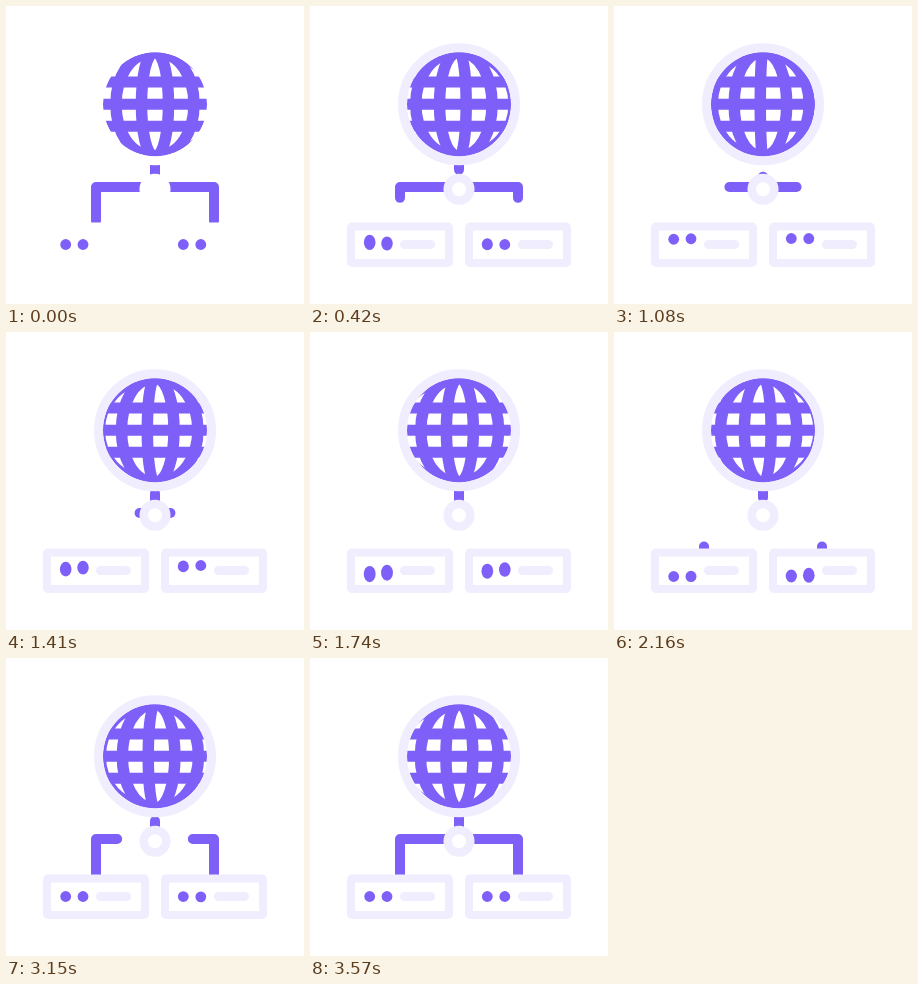
Recreate the animation shown at these times as an HTML page without scripts. Size 298 by 298 pixels, loop 3.6 s.

```html
<!DOCTYPE html>
<html lang="en">
<head>
<meta charset="utf-8">
<title>Network</title>
<style>
  :root { --main: #7e60f8; --pale: #f0edff; --loop: 3.6s; }
  html, body { margin: 0; width: 100%; height: 100%; overflow: hidden; background: #fff; }
  svg { display: block; width: 100vw; height: 100vh; }

  .line { fill: none; stroke: var(--main); stroke-width: 10; stroke-linecap: round; stroke-linejoin: round; }
  .pale { fill: #fff; stroke: var(--pale); stroke-width: 8.5; stroke-linecap: round; stroke-linejoin: round;
          animation: appear var(--loop) step-end infinite; }
  .wire { stroke-dasharray: 101 202; animation: wire var(--loop) linear infinite; }
  .stem { stroke-dasharray: 26 52; animation: stem 1.8s linear infinite; }
  .dot { fill: var(--main); transform-box: fill-box; transform-origin: center;
         animation: bob var(--loop) ease-in-out calc(var(--i) * .1s) infinite; }

  /* pale shapes are blank for the first instant of each loop */
  @keyframes appear { 0% { stroke: #fff } .833%, 100% { stroke: var(--pale) } }

  /* tail runs up to the hub, then a new head grows from the server */
  @keyframes wire {
    0% { stroke-dashoffset: -8 }
    47%, 47.01% { stroke-dashoffset: -101 }
    47.02%, 55.8% { stroke-dashoffset: 101 }
    100% { stroke-dashoffset: 13 }
  }
  @keyframes stem {
    0% { stroke-dashoffset: 0 }
    50% { stroke-dashoffset: -26 }
    50.01% { stroke-dashoffset: 26 }
    100% { stroke-dashoffset: 0 }
  }
  @keyframes bob {
    0%, 3.3% { translate: 0 0; scale: 1 1 }
    11.7% { scale: 1.08 1.4 }
    23.6% { translate: 0 -6px; scale: 1 1 }
    30% { scale: 1 1 }
    40% { scale: 1.08 1.35 }
    48% { scale: 1.1 1.5 }
    59.7% { translate: 0 6px; scale: 1 1 }
    83.3%, 100% { translate: 0 0; scale: 1 1 }
  }
</style>
</head>
<body>
<svg viewBox="0 0 298 298">
  <defs>
    <clipPath id="disc"><circle r="52"/></clipPath>
    <g id="server">
      <rect x="41" y="220.5" width="98" height="36.5" rx="1" stroke-width="8"/>
      <path d="M94.5 238.5H120.5" stroke-width="9"/>
    </g>
  </defs>

  <path class="line stem" d="M149 176V150"/>
  <path class="line wire" d="M90 223V181H149"/>
  <path class="line wire" d="M208 223V181H149"/>

  <g transform="translate(149 98.3)">
    <circle r="54" fill="#fff"/>
    <g class="line" clip-path="url(#disc)">
      <path d="M-60-22.3H60M-60 0H60M-60 22H60" stroke-width="11"/>
      <g stroke-width="11.5">
        <path><animate attributeName="d" dur="1.8s" repeatCount="indefinite"
          values="M0-52C82-52 82 52 0 52;M0-52C64-52 64 52 0 52;M0-52C52-52 52 52 0 52"/></path>
        <path><animate attributeName="d" dur="1.8s" repeatCount="indefinite"
          values="M0-52C52-52 52 52 0 52;M0-52C18-52 18 52 0 52"/></path>
        <path><animate attributeName="d" dur="1.8s" repeatCount="indefinite"
          values="M0-52C18-52 18 52 0 52;M0-52C-18-52 -18 52 0 52"/></path>
        <path><animate attributeName="d" dur="1.8s" repeatCount="indefinite"
          values="M0-52C-18-52 -18 52 0 52;M0-52C-52-52 -52 52 0 52"/></path>
        <path><animate attributeName="d" dur="1.8s" repeatCount="indefinite"
          values="M0-52C-52-52 -52 52 0 52;M0-52C-64-52 -64 52 0 52;M0-52C-82-52 -82 52 0 52"/></path>
      </g>
    </g>
  </g>

  <g class="pale">
    <circle cx="149" cy="98.3" r="56.5" fill="none" stroke-width="9"/>
    <circle cx="149" cy="183.3" r="11.3"/>
    <use href="#server"/>
    <use href="#server" x="118"/>
  </g>

  <circle class="dot" style="--i:0" cx="59.7" cy="238.5" r="5.4"/>
  <circle class="dot" style="--i:1" cx="77" cy="238.5" r="5.4"/>
  <circle class="dot" style="--i:2" cx="177.3" cy="238.5" r="5.4"/>
  <circle class="dot" style="--i:3" cx="194.8" cy="238.5" r="5.4"/>
</svg>
</body>
</html>
```
